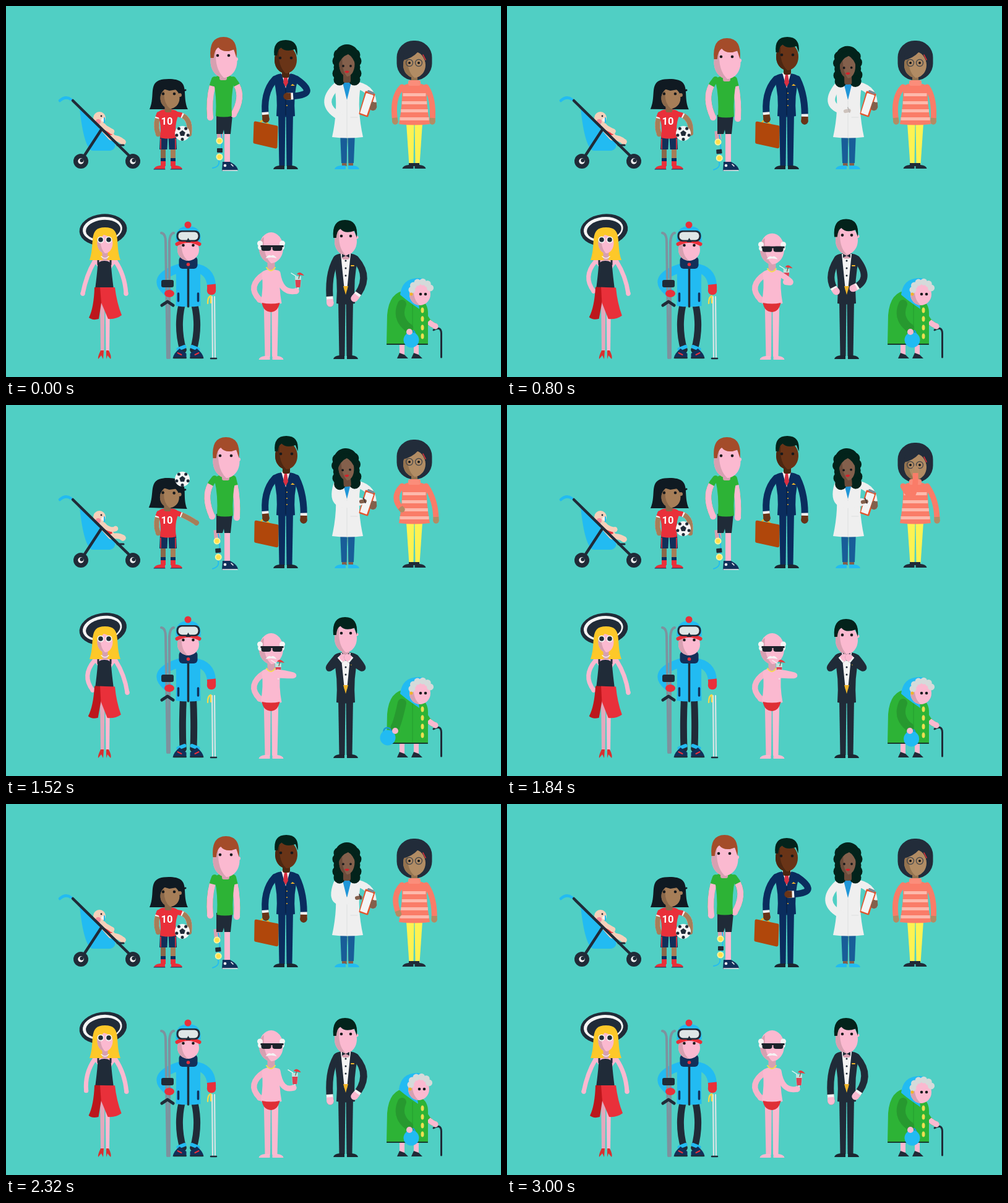
These frames come from a looping animation (800 by 600 pixels, 3.04 s). An HTML page:

```html
<!DOCTYPE html>
<html lang="en">
<head>
<meta charset="utf-8">
<title>Eleven people</title>
<style>
html, body { margin: 0; width: 100%; height: 100%; overflow: hidden; background: #50cfc4; }
svg { display: block; width: 100vw; height: 100vh; }
</style>
</head>
<body>
<svg id="stage" viewBox="0 0 800 600"></svg>
<script>
const LOOP = 3040, SIDES = [-1, 1];
const dark = '#202b38', navy = '#0a2d5e', ink = '#12305a', black = '#03231b', white = '#f4f4f4',
  red = '#e9303a', blue = '#22bbf2', green = '#2db336', gold = '#f0b429', yellow = '#fdc829', coral = '#fa7c68';
const pink = ['#fbb9d0', '#d7a0b1'], tan = ['#a67e58', '#8a684a'], sand = ['#b18c64', '#94734f'],
  brown = ['#693417', '#4c2711'], umber = ['#83604c', '#6b4c3b'];

// ---- drawing ----
const shape = (d, fill) => `<path d="${d}" fill="${fill}"/>`;
const line = (d, stroke, w) =>
  `<path d="${d}" fill="none" stroke="${stroke}" stroke-width="${w}" stroke-linecap="round" stroke-linejoin="round"/>`;
const oval = (x, y, rx, fill, ry = rx) => `<ellipse cx="${x}" cy="${y}" rx="${rx}" ry="${ry}" fill="${fill}"/>`;
const box = (x, y, w, h, fill, r = 0) => `<rect x="${x}" y="${y}" width="${w}" height="${h}" rx="${r}" fill="${fill}"/>`;
const repeat = (n, draw) => Array.from({ length: n }, (_, i) => draw(i)).join('');
const both = draw => SIDES.map(draw).join('');

// ---- body parts, symmetric about x ----
const eyes = (x, y, gap = 9, r = 2.3) => both(s => oval(x + s * gap, y, r, '#17191c'));
const neck = (x, y, [, shade], w = 12) => box(x - w / 2, y, w, 16, shade, 3);
function head(x, y, rx, ry, [skin, shade]) {
  const jaw = `C${x - rx} ${y + ry * .65} ${x - rx * .45} ${y + ry} ${x} ${y + ry}`;
  return shape(`M${x - rx} ${y}${jaw}C${x + rx * .45} ${y + ry} ${x + rx} ${y + ry * .65} ${x + rx} ${y}A${rx} ${ry} 0 0 0 ${x - rx} ${y}`, skin) +
    shape(`M${x - rx} ${y}${jaw}Q${x - rx * .7} ${y + ry * .5} ${x - rx * .6} ${y - ry * .7}Q${x - rx} ${y - ry * .5} ${x - rx} ${y}`, shade);
}
// Short hair with a side parting.
const crop = (x, top, w, h, fill) => shape(`M${x - w} ${top + h}Q${x - w * 1.15} ${top} ${x} ${top}Q${x + w * 1.15} ${top} ${x + w} ${top + h}` +
  `L${x + w * .8} ${top + h * .6}Q${x} ${top + h * .8} ${x - w * .4} ${top + h * .5}Q${x - w * .7} ${top + h * .6} ${x - w * .75} ${top + h}Z`, fill);
// Long hair that widens from w to flare.
const bell = (x, top, bottom, w, flare, fill) => shape(`M${x} ${top}` +
  `C${x + w * 1.5} ${top} ${x + w * .8} ${(top + bottom) / 2} ${x + flare} ${bottom}H${x - flare}` +
  `C${x - w * .8} ${(top + bottom) / 2} ${x - w * 1.5} ${top} ${x} ${top}`, fill);
function torso(x, top, bottom, shoulder, waist, hem, fill) {
  const mid = (top + bottom) / 2;
  return shape(`M${x} ${top}Q${x + shoulder} ${top} ${x + shoulder} ${top + 9}Q${x + waist} ${mid} ${x + hem} ${bottom}` +
    `Q${x} ${bottom + 3} ${x - hem} ${bottom}Q${x - waist} ${mid} ${x - shoulder} ${top + 9}Q${x - shoulder} ${top} ${x} ${top}`, fill);
}
const legs = (x, top, bottom, hip, ankle, ...fills) => both(s =>
  shape(`M${x + s * .5} ${top}H${x + s * hip}L${x + s * ankle} ${bottom}H${x + s * 1.5}Z`, s < 0 ? fills[0] : fills[1] || fills[0]));
const shoes = (x, y, fill, gap = 2) => both(s => shape(`M${x + s * gap} ${y}h${s * 8}q${s * 9} 1 ${s * 10} 6h${-s * 18}z`, fill));

// ---- motion ----
const updates = [];
function animated(update, content, attrs = '') {
  const id = 'part' + updates.length;
  updates.push({ id, update });
  return `<g id="${id}" ${attrs}>${content}</g>`;
}
const ease = u => { u = Math.min(1, Math.max(0, u)); return u * u * (3 - 2 * u); };
// An act is a weight over time; a move is [act, ...offsets at full weight].
const span = (from, to, ramp = 400) => t => ease((t - from) / ramp) - ease((t - to) / ramp);
const blend = (base, moves, t) =>
  base.map((v, i) => moves.reduce((sum, [act, ...by]) => sum + act(t) * (by[i] || 0), v));

// pose = [elbow x, elbow y, hand x, hand y]
function limb(width, { skin, sleeve, from = 100, cuff }, [x, y], pose, ...moves) {
  const part = (color, start) =>
    `<path pathLength="100" stroke="${color}" stroke-dasharray="100 100" stroke-dashoffset="${-start}"/>`;
  const content = `<path stroke="${sleeve || skin}" stroke-linecap="round"/>` +
    (cuff ? part(cuff, from - 6) : '') + (sleeve ? part(skin, from) : '') + `<circle r="${width * .52}" fill="${skin}" stroke="none"/>`;
  return animated((el, t) => {
    const [ex, ey, hx, hy] = blend(pose, moves, t);
    for (const path of el.querySelectorAll('path')) path.setAttribute('d', `M${x} ${y}Q${ex} ${ey} ${hx} ${hy}`);
    el.lastChild.setAttribute('cx', hx);
    el.lastChild.setAttribute('cy', hy);
  }, content, `fill="none" stroke-width="${width}"`);
}
// offsets = dx, dy, turn, opacity
function moving(moves, [cx, cy], ...kids) {
  return animated((el, t) => {
    const [x, y, turn, opacity] = blend([0, 0, 0, 1], moves, t);
    el.setAttribute('transform', `translate(${x} ${y}) rotate(${turn} ${cx} ${cy})`);
    el.setAttribute('opacity', opacity);
  }, kids.join(''));
}
const blink = (from, to, y, content) => animated((el, t) => {
  const k = t >= from && t < to ? .35 : 1;
  el.setAttribute('transform', `translate(0 ${y * (1 - k)}) scale(1 ${k})`);
}, content);

// ---- people ----
function stroller() {
  const kick = span(700, 1560, 600), skin = '#f6d0ba';
  const wheel = x => oval(x, 251, 12, dark) + oval(x, 251, 4.7, white) + oval(x + 1.3, 249.8, 3, dark);
  return shape('M119 166L176 222Q178 232 168 234H140Q126 231 119 166Z', blue) +
    line('M156 195L170 211', skin, 12) + line('M163 200L168 207', red, 7) +
    limb(9, { skin }, [170, 213], [182, 213, 189, 220], [kick, 0, -3, 0, -5]) +
    limb(8, { skin }, [159, 196], [167, 200, 171, 203], [kick, 4, 4, 6, -3]) +
    oval(151, 181, 10, skin) + oval(149, 187, 4, '#f48d99') + oval(157, 184, 3, white) +
    line('M159 181V188', blue, 2) + oval(154, 178, 1.4, dark) +
    line('M87 153Q96 145 105 151', blue, 4.5) + line('M108 153L204 247M154 200L122 249', dark, 4.5) +
    line('M180 225H190', dark, 3) + wheel(121) + wheel(205);
}

function ball() {
  const ring = (r, turn) => Array.from({ length: 5 }, (_, i) => {
    const a = (i * 72 + turn) * Math.PI / 180;
    return [r * Math.cos(a), r * Math.sin(a)];
  });
  const fall = (t, apex, y) => y + ((t - apex) / 22) ** 2;
  return animated((el, t) => {
    const y = t < 1000 ? 206 : t < 1150 ? fall(t, 1000, 206) : t < 1643 ? fall(t, 1423, 100) : 200 + 6 * ease((t - 1840) / 160);
    el.setAttribute('transform', `translate(285 ${y})`);
  }, oval(0, 0, 12, white) + `<polygon points="${ring(5, -90).join(' ')}" fill="${dark}"/>` +
    ring(9.6, -54).map(([x, y]) => oval(x, y, 2.5, dark)).join(''));
}

function player() {
  const x = 262, hair = '#101a22', release = span(720, 1500, 340), reach = span(1120, 1480, 280);
  const sleeved = { skin: tan[0], sleeve: red, from: 22, cuff: white };
  return both(s => box(x - 4 + s * 8, 228, 8, 30, tan[s < 0 ? 1 : 0]) + box(x - 4 + s * 8, 246, 8, 6, navy) + box(x - 4 + s * 8, 251, 8, 8, red)) +
    shoes(x, 258, red, 5) + line('M239 264H257M266 264H284', navy, 1) +
    legs(x, 210, 232, 13, 14, ink) + both(s => line(`M${x + s * 12} 215V231`, red, 1.6)) +
    limb(8, sleeved, [247, 175], [240, 192, 246, 207]) +
    limb(8, sleeved, [277, 175], [300, 178, 296, 207], [release, -10, 6, 6, -11], [reach, 4, -3, 6, -6]) +
    torso(x, 167, 213, 17, 10, 13, red) +
    `<text x="260" y="191.5" text-anchor="middle" font-family="Roboto, sans-serif" font-weight="700" font-size="16.5" fill="#fff">10</text>` +
    moving([[release, -1, 0, 2]], [x, 160],
      bell(x + 1, 118, 167, 25, 31, hair), line('M280 134Q286 138 290 136', hair, 3), neck(x, 156, tan, 11),
      head(265, 149, 15.5, 17, tan), oval(281, 144, 3, tan[0]),
      shape('M245 146Q242 120 262 120Q284 120 281 140L276 135L264 137L254 134L249 141Z', hair), eyes(263, 142)) +
    ball();
}

function runner() {
  const lean = span(40, 2380), x = 352;
  const sleeved = { skin: pink[0], sleeve: green, from: 18 };
  const lamp = y => oval(345, y, 5.5, '#fff3a0') + oval(345, y, 3.5, '#ffe04a');
  return box(353, 203, 9, 54, pink[0]) + shape('M350 252H362Q374 258 375 266L349 267Z', ink) +
    line('M350 266H374M364 256L367 259', white, 1.5) + oval(354, 258, 2.3, white) +
    moving([[lean, -4, 2, -5]], [345, 218],
      box(341, 200, 10, 14, pink[1]), line('M344 250Q346 260 334 262M348 207Q350 222 347 242', blue, 1.8),
      lamp(218), box(341, 230, 9, 7, dark, 1), lamp(244)) +
    shape('M340 176H366L363 207H353L352 200L350 207H340Z', dark) +
    limb(10, sleeved, [337, 119], [327, 145, 330, 180], [span(40, 1900), -11, -2, 3, 0]) +
    limb(10, sleeved, [367, 119], [387, 143, 368, 175], [lean, -12, 3, 5, 7]) +
    moving([[lean, 2, 1]], [x, 0], torso(x, 112, 178, 17, 11, 13, green)) +
    moving([[lean, 4, 2]], [x, 0],
      neck(x - 1, 104, pink), head(x, 89, 21.5, 27, pink), oval(372, 86, 3, pink[0]),
      crop(x - .5, 50, 21, 34, '#a44c2a'), eyes(x - 1, 80));
}

// Trousers, jacket and shirt front shared by both suits.
const suit = (x, top, bottom, ground, fill) =>
  legs(x, bottom - 6, ground - 5, 12, 10.5, fill) + shoes(x, ground - 6, '#1c2731') + torso(x, top, bottom, 20, 12, 15, fill);

function commuter() {
  const x = 452, work = span(40, 2420);
  const sleeved = { skin: brown[0], sleeve: navy, from: 90, cuff: white };
  return moving([[work, 1, 0, -1]], [420, 183],
      line('M411 189Q413 181 425 192', gold, 2.5),
      line('M403 189L437 196L436 228L402 220Z', '#b0470b', 5), shape('M403 189L437 196L436 228L402 220Z', '#b0470b')) +
    limb(11, sleeved, [435, 118], [414, 140, 420, 183]) +
    suit(x, 109, 178, 264, navy) +
    shape(`M${x - 7} 108H${x + 7}L${x} 133Z`, white) + shape(`M${x - 2} 110h4l2 14-4 7-4-7z`, '#d82f42') +
    line(`M${x} 134V176`, '#082143', 1.3) + shape('M460 129l3-3 4 3z', gold) + repeat(3, i => oval(454, 141 + i * 10, 1, gold)) +
    limb(11, sleeved, [469, 118], [510, 146, 454, 146], [work, -27, 0, 27, 40]) +
    moving([[work, 1, -5]], [x, 0],
      neck(x, 100, brown), head(x, 87, 18, 22, brown), crop(x, 55, 18.5, 25, black), eyes(x, 84));
}

function doctor() {
  const x = 551, coat = '#efefef', jeans = '#185d98', work = span(640, 2350, 440);
  const rest = t => 1 - work(t), scribble = t => span(1150, 1900, 200)(t) * (.8 + .2 * Math.sin(t / 40));
  return legs(x + 1, 205, 259, 10, 9, umber[0]) + legs(x + 1, 205, 254, 12, 10, jeans) + shoes(x, 258, blue) +
    limb(12, { skin: umber[0], sleeve: coat, from: 85 }, [570, 129], [594, 135, 593, 163]) +
    torso(x + 1, 121, 212, 21, 15, 25, coat) +
    shape(`M${x - 8} 120H${x + 8}L${x} 152Z`, '#2096d8') + line(`M${x} 153V213M557 180H568`, '#dcdfdf', 1) +
    line('M582 139L595 143L584 178L572 174Z', '#e3542c', 3) + shape('M582 141L594 145L583 177L572 173Z', white) +
    line('M586 138L593 141', '#7c8994', 4) + line('M593 158L591 165', umber[0], 6) +
    limb(12, { skin: coat }, [535, 129], [504, 158, 538, 178], [work, 16, 12, 27, -26], [scribble, 2, 2, 8, 5]) +
    moving([[rest, -29, 26, 0, -1], [scribble, 8, 5]], [567, 152],
      line('M567 152L573 151', umber[0], 6), line('M571 146L574 154', '#3b3030', 1.5)) +
    moving([[span(640, 1950), 0, 8, -4]], [x, 110],
      oval(x, 77, 18, black, 15), both(s => repeat(5, i => oval(x + s * (12 + i % 2 * 2), 79 + i * 10, 9.5, black))),
      neck(x, 108, umber), head(x, 94, 12.5, 20, umber),
      shape(`M${x - 15} 98Q${x - 14} 70 ${x} 70Q${x + 14} 70 ${x + 15} 98Q${x + 10} 82 ${x + 2} 78Q${x - 10} 82 ${x - 15} 98`, black),
      eyes(x, 97, 6, 1.9), shape(`M${x - 4} 106q4-3 8 0q-4 5-8 0`, '#d3212b'));
}

function reader() {
  const x = 660, hair = '#222c3a', stretch = span(1160, 2150, 350), cough = span(1560, 1900, 260);
  const sleeved = { skin: sand[0], sleeve: coral, from: 90 };
  return legs(x, 190, 256, 13, 8.5, '#fdf252') + shoes(x - .5, 257, dark, 1) + box(651, 254, 17, 5, dark) +
    limb(9, sleeved, [679, 131], [692, 150, 689, 187], [stretch, 3, 4, 6, 0]) +
    torso(x, 125, 191, 20, 19, 25, coral) +
    repeat(4, i => box(x - 18.5 - i * 1.7, 141 + i * 13, 37 + i * 3.4, 5, '#fdb9ac')) +
    moving([[cough, 0, 5]], [x, 0],
      box(x - 28.5, 56, 57, 64, hair, 27), neck(x, 107, sand, 10), head(x, 95, 18, 21, sand),
      shape(`M${x - 19} 96Q${x - 20} 66 ${x} 66Q${x + 20} 66 ${x + 19} 95Q${x + 16} 80 ${x + 6} 74Q${x - 4} 85 ${x - 19} 88Z`, hair),
      line('M674 79L678 87', red, 1.6), eyes(x - .5, 92, 7.5, 2),
      both(s => `<circle cx="${x - .5 + s * 7.5}" cy="92" r="5.5" fill="none" stroke="#4a4a4c" stroke-width="1.4"/>`)) +
    box(650, 120, 20, 9, '#fb8d7a', 3) +
    limb(9, sleeved, [640, 131], [623, 148, 629, 187], [stretch, -1, 2, 11, -18], [cough, 40, 22, 20, -66]);
}

function sunLady() {
  const x = 160, pose = span(100, 1900, 700), sway = t => .5 - .5 * Math.cos(6 * Math.PI * t / LOOP);
  return legs(x, 475, 559, 8, 7, '#e2a9bd', pink[0]) +
    shape('M153 557H158L157 571L154 565L149 571Q148 567 153 557ZM162 557H166Q171 567 169 571L164 565L162 571Z', '#d92f2f') +
    limb(7, { skin: pink[0] }, [143, 413], [130, 435, 124, 465], [pose, -8, 3, 16, -4]) +
    limb(7, { skin: pink[0] }, [177, 413], [192, 435, 194, 465], [pose, 0, 2, 2, 0]) +
    torso(x, 406, 425, 20, 15, 10, pink[0]) + torso(x - 1, 412, 458, 11, 12, 15, dark) +
    both(s => line(`M${x - 1 + s * 10} 407V418`, dark, 3)) +
    moving([[pose, 0, 0, 1.5]], [x, 456],
      shape('M143 455H160L154 480L150 506Q140 509 134 504Q142 488 143 455Z', '#bd171c'),
      shape('M152 455H176Q179 480 187 500Q178 507 165 506L154 480Z', red)) +
    moving([[sway, 0, 0, -5]], [157, 364],
      `<g transform="rotate(-5 157 362)">${oval(157, 362, 38.5, dark, 25.5)}${oval(156, 361, 32, white, 20)}${oval(157, 362, 28, dark, 16)}</g>`) +
    bell(x, 358, 411, 19, 25, yellow) + neck(x, 395, pink, 9) + head(x, 383, 12.5, 17, pink) +
    shape('M146 382Q147 361 161 362Q175 363 173 381Q168 372 158 370Z', yellow) + line('M154 405Q160 411 166 405', white, 1.5) +
    both(s => oval(x - .5 + s * 6.5, 378, 5.5, white) + oval(x - .5 + s * 6.5, 378, 3.8, dark));
}

function skier() {
  const x = 294.5, rise = span(1160, 1900, 340);
  return both(s => limb(11, { skin: dark }, [x + s * 8, 474], [x + s * 20, 515, x + s * 8.5, 556], [rise, -s * 10, 0, 0, 0]) +
      line(`M${x + s * 16} 555L${x + s * 6} 551`, blue, 6) +
      shape(`M${x + s * 14} 554L${x + s * 3} 562V570H${x + s * 25}Q${x + s * 24} 562 ${x + s * 14} 554`, ink) +
      line(`M${x + s * 4} 569H${x + s * 23}`, dark, 2.5) + line(`M${x + s * 17} 561L${x + s * 11} 564`, red, 2)) +
    line('M333 470L334 570M337 470L338 570', '#d9e5e6', 2.2) + line('M331 570H340', dark, 2.5) +
    moving([[rise, 0, -7]], [x, 0],
      limb(14, { skin: blue }, [280, 424], [231, 440, 263, 464]),
      limb(14, { skin: red, sleeve: blue, from: 80 }, [309, 424], [334, 430, 332, 460]),
      torso(x, 415, 485, 20, 19, 20, blue), line(`M${x} 420V486`, dark, 3.5),
      both(s => line(`M${x + s * 16} 465V477`, ink, 3.5)),
      line('M251 367Q258 368 258 382L261 569M271 367Q265 368 264 382V569', '#7d929e', 4),
      box(251, 443, 20, 12, dark, 3), line('M252 484L261 478L270 484', dark, 5), oval(264, 465, 8, red, 6),
      box(x - 15, 405, 30, 20, ink, 6), head(x, 394, 17.5, 18, pink), oval(x, 418, 2.8, red),
      shape(`M${x - 20} 381Q${x - 22} 356 ${x} 356Q${x + 22} 356 ${x + 20} 381Z`, blue), oval(x - .5, 354, 5.5, red),
      line(`M${x - 18} 385Q${x} 375 ${x + 18} 385`, red, 6),
      box(x - 19, 363, 38, 18, dark, 8), box(x - 16, 365.5, 32, 13, '#dfe6e6', 6), shape(`M${x - 4} 382L${x} 375L${x + 4} 382Z`, dark),
      eyes(x, 387, 8)) +
    line('M326 481Q326 470 331 469V480', '#f6d94a', 2.3);
}

function sunbather() {
  const x = 428.5, skin = pink[0], lift = span(80, 2320, 440), sip = span(560, 1900, 440);
  return legs(x, 470, 567, 12, 10, '#f6b3ca', skin) + shoes(x, 566, skin) +
    limb(9.5, { skin: '#f6b3ca' }, [418, 433], [388, 453, 410, 475]) +
    torso(x, 426, 481, 15, 12, 17, skin) + shape(`M${x - 15} 480Q${x} 483 ${x + 14} 480Q${x + 11} 494 ${x} 495Q${x - 13} 494 ${x - 15} 480`, '#df2f35') +
    moving([[sip, 0, 3]], [x, 0],
      neck(x, 411, pink), line('M421 423Q428 433 435 423', '#f7dc4b', 2), head(x, 391, 19.5, 25, pink),
      both(s => oval(x + s * 18, 384, 4.5, white) + oval(x + s * 17, 390, 4.5, white)),
      box(x - 17, 387, 37, 3, '#1c222b'), both(s => box(x + 1 + s * 9 - 8, 387, 16, 9, '#1c222b', 4)),
      shape(`M${x - 9} 408Q${x - 4} 401 ${x} 404Q${x + 4} 401 ${x + 9} 408Q${x} 405 ${x - 9} 408`, white)) +
    moving([[lift, -5, -2], [sip, -27, -17]], [x, 0],
      line('M469 437L461 432', white, 1.3), line('M472 455V462', '#e6eeee', 2),
      shape('M467 437H477L476 455H468Z', '#bfe3de'), shape('M467.5 443H476.5L475.5 455H468.5Z', '#da4152'),
      line('M473 441L475 433', '#8a4a3c', 1.2), shape('M470 434Q474 427 482 436Z', '#e53a3e')) +
    limb(9, { skin }, [439, 432], [444, 466, 469, 461], [lift, 0, 0, -4, -2], [sip, 46, -26, -25, -22]);
}

function groom() {
  const x = 549, cuffs = span(640, 1880), tie = span(1140, 1880, 320);
  const sleeved = { skin: pink[0], sleeve: dark, from: 91, cuff: white };
  return suit(x, 400, 481, 571, dark) +
    shape(`M${x - 8} 401H${x + 8}L${x + 2} 460H${x - 2}Z`, white) + shape(`M${x - 4} 453H${x + 4}L${x} 467Z`, gold) +
    repeat(3, i => oval(x, 412 + i * 12, 1.5, dark)) + line('M558 420H562', gold, 2) +
    moving([[span(640, 1540, 340), 0, -3]], [x, 0],
      neck(x, 394, pink), head(x, 380, 18, 23, pink), oval(567, 374, 2.5, pink[0]),
      crop(x - 1, 346, 19, 29, black), blink(1060, 1180, 372, eyes(x + .5, 372, 7.5))) +
    both(s => shape(`M${x} 404L${x + s * 6} 401V407Z`, dark)) +
    limb(11, sleeved, [534, 409], [519, 435, 524, 481], [cuffs, -13, 15, 23, -54], [tie, 0, -8, -2, -19]) +
    limb(11, sleeved, [565, 409], [592, 440, 563, 473], [cuffs, 0, 10, -11, -46], [tie, 0, -8, 0, -19]);
}

function granny() {
  const swing = span(1020, 1540, 340);
  const shoe = x => box(x + 4, 544, 8, 21, pink[0]) + shape(`M${x + 4} 561L${x + 12} 564L${x + 18} 570H${x}Z`, dark);
  return shoe(632) + shoe(655) + line('M691 524Q703 517 703.5 529V568', dark, 3) +
    limb(9, { skin: pink[0], sleeve: green, from: 62 }, [674, 490], [676, 510, 694, 518]) +
    shape('M648 460Q619 461 616 500L615 548H682V500Q683 481 670 475Z', green) + line('M616 547H681', '#173a2c', 2) +
    line('M657 482V545', '#249c2f', 1) + repeat(4, i => oval(673, 492 + i * 14, 2.5, '#f2dd52', 4.5)) +
    moving([[span(2040, 2400, 260), -2, -5]], [0, 0],
      shape('M637 467Q640 440 667 440Q678 440 684 450L666 474L668 490L655 481Q645 474 637 467Z', blue),
      head(669, 466, 17, 18, pink),
      repeat(6, i => oval(671 + 15 * Math.cos(Math.PI + i * .58), 459 + 13 * Math.sin(Math.PI + i * .58), 5.5, '#d5dada')),
      oval(655, 466, 2.5, gold), blink(460, 600, 466, eyes(674, 466, 4))) +
    moving([[swing, -38, -2]], [0, 0],
      line('M648 534Q648 523 655 524Q662 525 661 534', '#1599d8', 2.5), oval(655, 540, 12.5, blue)) +
    limb(14, { skin: '#27992f' }, [640, 482], [630, 505, 651, 521], [swing, 4, 5, -22, 0]) +
    moving([[swing, -23, 0]], [0, 0], oval(652, 527, 5, pink[0]));
}

const stage = document.getElementById('stage');
stage.innerHTML = [stroller, player, runner, commuter, doctor, reader, sunLady, skier, sunbather, groom, granny]
  .map(person => person()).join('');
for (const part of updates) part.el = document.getElementById(part.id);

const start = performance.now();
function frame() {
  const t = (performance.now() - start) % LOOP;
  for (const part of updates) part.update(part.el, t);
  requestAnimationFrame(frame);
}
frame();
</script>
</body>
</html>
```
